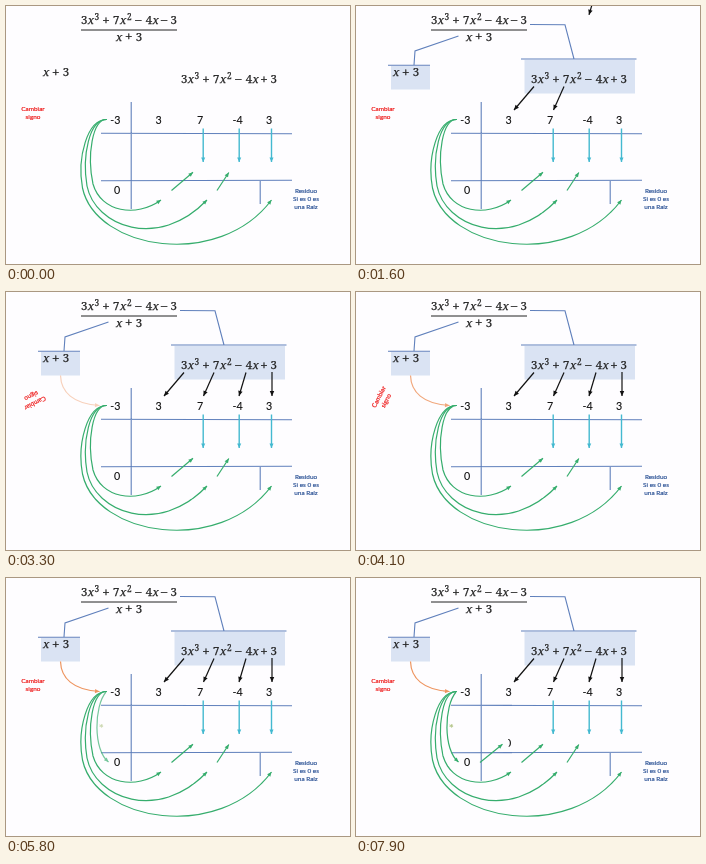
An HTML page for the animation above (8000 ms loop, 344 by 258 pixels).

```html
<!DOCTYPE html>
<html lang="es">
<head>
<meta charset="utf-8">
<style>
  html, body { margin: 0; width: 100%; height: 100%; overflow: hidden; background: #fefdff; }
  svg { display: block; width: 100vw; height: 100vh; }
  path { fill: none; }
  .math { font-family: "Noto Serif", "Liberation Serif", serif; font-size: 11.4px; fill: #222; stroke: #222; stroke-width: .25; }
  .math.i { font-style: italic; }
  .math.s { font-size: 8.3px; }
  .math.o { font-size: 13.4px; }
  .digit { font-family: Lato, "Open Sans", sans-serif; font-size: 10.7px; text-anchor: middle; fill: #111; stroke: #111; stroke-width: .12; }
  .star { font-size: 12px; fill: #a9bd78; stroke: #a9bd78; }
  .note { font-family: Lato, "Open Sans", sans-serif; font-size: 6.4px; text-anchor: middle; stroke-width: .2; }
  .blue { stroke: #6080bc; stroke-width: 1.1; }
</style>
</head>
<body>
<svg id="stage" viewBox="0 0 344 258">
  <defs>
    <clipPath id="wheel"><path id="pie"/></clipPath>
    <clipPath id="wipe"><rect id="wipeBox" x="118" width="36" y="160" height="0"/></clipPath>
  </defs>
  <g id="callouts">
    <rect x="35" y="60" width="39" height="23.5" fill="#dae3f3"/>
    <rect x="168.5" y="54" width="110.5" height="33.5" fill="#dae3f3"/>
    <path class="blue" d="M32 59.3H74M102.5 30L59 45L58 59M165 53H280.5M174 18.5L209 18.8L218 53"/>
  </g>
  <path d="M75 24H171" stroke="#222"/>
  <path class="blue" d="M125.2 96V203M95 127.2L286 127.7M95 174.8L286 174.2M254.2 174.5V198"/>
  <g id="labels"></g>
  <g id="signNote" class="note" fill="#ee1c1c" stroke="#ee1c1c">
    <text x="27" y="104.5">Cambiar</text><text x="27" y="112.6">signo</text>
  </g>
  <g class="note" fill="#2f5597" stroke="#2f5597">
    <text x="300" y="186.5">Residuo</text><text x="300" y="194.9">Si es 0 es</text><text x="300" y="203.2">una Raíz</text>
  </g>
  <g id="arrows"></g>
</svg>
<script>
const NS = 'http://www.w3.org/2000/svg';
const $ = id => document.getElementById(id);
const LOOP = 8000, STEP = 100;
const GREEN = '#36ad6d', CYAN = '#43b9d0', BLACK = '#111', ORANGE = '#ee9560';

function add(parent, tag, attrs, text) {
  const el = document.createElementNS(NS, tag);
  for (const key in attrs) el.setAttribute(key, attrs[key]);
  if (text) el.textContent = text;
  return parent.appendChild(el);
}

function arrow(d, color, head = 4.5, width = 1.2) {
  const group = add($('arrows'), 'g', {});
  const line = add(group, 'path', { d, stroke: color, 'stroke-width': width });
  const length = line.getTotalLength();
  const tip = line.getPointAtLength(length);
  const back = line.getPointAtLength(length - head);
  const angle = Math.atan2(tip.y - back.y, tip.x - back.x) * 180 / Math.PI;
  add(group, 'polygon', {
    points: `0,0 ${-head},${-head * .45} ${-head},${head * .45}`, fill: color,
    transform: `translate(${tip.x} ${tip.y}) rotate(${angle})`
  });
  return group;
}

// Each term is [offset, text, kind]: i italic, s superscript, o operator.
function formula(x, y, terms) {
  for (const [dx, text, kind = ''] of terms) {
    add($('labels'), 'text', {
      class: `math ${kind}`, x: x + dx, y: kind === 's' ? y - 4.3 : kind === 'o' ? y + .5 : y
    }, text);
  }
}
const cubic = sign => [
  [0, '3'], [6.7, 'x', 'i'], [13.6, '3', 's'], [21.3, '+', 'o'], [32, '7'], [39.1, 'x', 'i'],
  [46, '2', 's'], [53.6, '−', 'o'], [64.8, '4'], [71.6, 'x', 'i'], [79.2, sign, 'o'], [89.6, '3']
];
const divisor = [[0, 'x', 'i'], [9, '+', 'o'], [19.8, '3']];
formula(75, 18.1, cubic('−'));
formula(175, 77.1, cubic('+'));
formula(110, 34.5, divisor);
formula(37, 70.3, divisor);

const digit = (x, y, text) => add($('labels'), 'text', { class: 'digit', x, y }, text);
[[109.3, '-3'], [152.7, '3'], [194.2, '7'], [231.5, '-4'], [263, '3']].forEach(([x, s]) => digit(x, 117.5, s));
digit(111.2, 187.8, '0');
digit(152.2, 169, '0').setAttribute('clip-path', 'url(#wheel)');

[197.2, 233.2, 265.5].forEach(x => arrow(`M${x} 122.5V156`, CYAN, 4.5, 1.4));
arrow('M165.5 184.5L187 166.3', GREEN);
arrow('M211 184.5L222.8 166.5', GREEN);
arrow('M101 113.5C86 113 81 150 87 178C95 206 130 212 155 194', GREEN);
arrow('M101 113.5C83 113 76 150 81 180C89 220 152 245 201 194', GREEN);
arrow('M101 113.5C81 113 71 152 76.5 182C90 244 213 264 265.5 194', GREEN);

const drops = ['M178 80.5L158 104', 'M208 80.5L197.5 104', 'M240 80.5L233 104', 'M266 80V104']
  .map(d => arrow(d, BLACK, 5));
const signCurve = arrow('M54.5 83.5C55 100 67 112 93.5 113.5', ORANGE);
const copyCurve = arrow('M100 114C88 128 87 172 102.5 184', GREEN);
add(copyCurve, 'text', { class: 'digit star', x: 95.3, y: 154.5 }, '*');
const product = arrow('M124 184.5L146.5 166.3', GREEN);
product.setAttribute('clip-path', 'url(#wipe)');

const progress = (t, start, length) => Math.min(1, Math.max(0, (t - start) / length));

function piePath(part) {
  const cx = 152.2, cy = 165.2, r = 15, points = [`M${cx} ${cy}`];
  for (let i = 0; i <= 40; i++) {
    const a = part * i / 40 * 2 * Math.PI;
    points.push(`L${cx + r * Math.sin(a)} ${cy - r * Math.cos(a)}`);
  }
  return points.join('') + 'Z';
}

function render(t) {
  $('callouts').setAttribute('opacity', progress(t, 0, 450));
  drops.forEach((drop, i) => {
    const p = progress(t, 450 + 500 * i, 500);
    drop.setAttribute('transform', `translate(0 ${-136 * (1 - p)})`);
  });
  const spin = progress(t, 2450, 2000);
  $('signNote').setAttribute('transform', `rotate(${360 * spin} 27 107)`);
  signCurve.setAttribute('opacity', spin);
  copyCurve.setAttribute('opacity', progress(t, 4450, 2000));
  const wipe = 28 * progress(t, 6450, 500);
  $('wipeBox').setAttribute('y', 188 - wipe);
  $('wipeBox').setAttribute('height', wipe);
  $('pie').setAttribute('d', piePath(progress(t, 6950, 2000)));
}

const begin = performance.now();
function tick() {
  const t = (performance.now() - begin) % LOOP;
  render(Math.floor(t / STEP) * STEP);
  requestAnimationFrame(tick);
}
tick();
</script>
</body>
</html>
```
